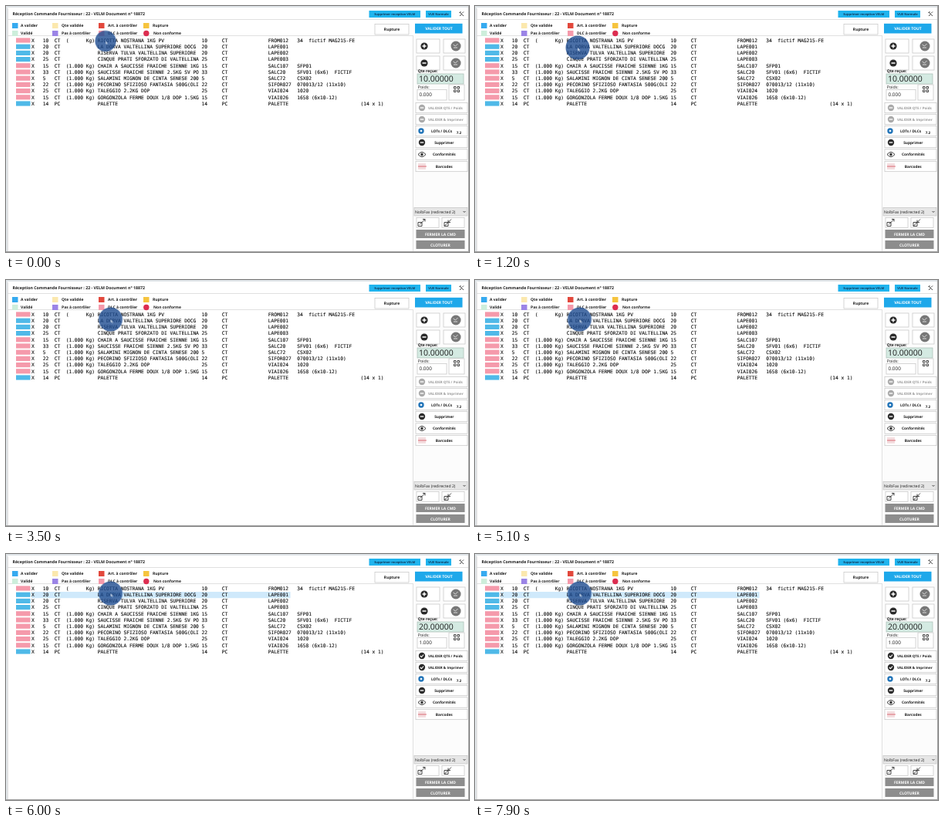
Animation of 600 by 319 pixels, one loop 8 s. Source, as an HTML page:

```html
<!DOCTYPE html>
<html lang="fr">
<head>
<meta charset="utf-8">
<title>Réception commande</title>
<style>
html, body { margin: 0; width: 100%; height: 100%; overflow: hidden; background: #fff; }
svg { display: block; width: 600px; height: 319px; }
text { font: 5px "Open Sans", "Noto Sans", sans-serif; fill: #1c1c1c; text-rendering: geometricPrecision; white-space: pre; }
.b { font-weight: 700; }
.mid { text-anchor: middle; }
.mono { font: 6.23px "DejaVu Sans Mono", monospace; fill: #111; stroke: #111; stroke-width: .12; }
.w { fill: #fff; }
.tiny { font-size: 4px; fill: #123a5c; }
.total { font-size: 10.5px; font-weight: 500; }
.weight { font-size: 6.4px; }
.btn { fill: #fff; stroke: #c4c4c4; stroke-width: .7; }
.line { fill: none; stroke: #333; stroke-width: .9; }
.sel, .on, .off { animation: 8s step-end infinite; }
.sel { animation-name: select; }
.on { animation-name: show; }
.off { animation-name: hide; }
.dot { animation: move 8s linear infinite; }
@keyframes select { 0% { opacity: 0 } 66.25%, 100% { opacity: 1 } }
@keyframes show { 0% { opacity: 0 } 68.75%, 100% { opacity: 1 } }
@keyframes hide { 0% { opacity: 1 } 68.75%, 100% { opacity: 0 } }
@keyframes move {
  0% { transform: translate(129px, 45.5px) scale(.88); animation-timing-function: steps(6) }
  7.5% { transform: translate(130px, 56px) scale(1); animation-timing-function: steps(6) }
  15% { transform: translate(133px, 54px) scale(1); animation-timing-function: steps(9) }
  26.25%, 100% { transform: translate(135.5px, 51px) scale(1) }
}
</style>
</head>
<body>
<svg viewBox="0 0 600 319">
  <rect width="600" height="319" fill="#fff"/>
  <path d="M0 0H600V2H2V319H0z" fill="#dfe4e7"/>
  <path d="M2 17.5H599M2 38.5H527M2.5 3V318M527.5 38V318" fill="none" stroke="#d9d9d9" stroke-width=".8"/>
  <rect x="528" y="38" width="71" height="280" fill="#fcfcfc"/>
  <path d="M0 318.5H600M599.5 0V319" fill="none" stroke="#a0a0a0"/>

  <text class="b" x="8.5" y="12" style="font-size:5.27px">Réception Commande Fournisseur : 22 - VELM Document n° 18872</text>
  <g fill="#20b4ee">
    <rect x="470.5" y="6" width="66.5" height="9"/>
    <rect x="544" y="6" width="33" height="9"/>
  </g>
  <text class="b mid tiny" x="503.7" y="12">Supprimer reception VELM</text>
  <text class="b mid tiny" x="560.5" y="12">VUE Normale</text>
  <path class="line" d="M588 8l5 5M588 13l3-3M587.5 8.5l2-1M591 9.5l2-2" stroke-width="1.2"/>

  <g id="legend"></g>

  <rect class="btn" x="478" y="23.5" width="44" height="13.5"/>
  <text class="b mid" x="500" y="32">Rupture</text>
  <rect x="530" y="22.800" width="61.500" height="12.700" fill="#1ea8ea"/>
  <text class="b mid w" x="561" y="31">VALIDER TOUT</text>

  <rect class="sel" x="33" y="49" width="335.5" height="8.2" fill="#cfe9fb"/>
  <g id="rows"></g>

  <g id="tools"></g>
  <path d="M539.5 52h5M542 49.5v5M539.5 74h5" fill="none" stroke="#fff" stroke-width="1.5"/>
  <path d="M579.5 50l3 2 3-3M580 54h5M579.5 72l3 2 3-3M580 76h5" fill="none" stroke="#d8d8d8"/>

  <text class="b" x="533.700" y="85.500">Qte reçue:</text>
  <rect x="533" y="88" width="60" height="13" fill="#d4eae2" stroke="#a9bdb6" stroke-width=".7"/>
  <text x="533.700" y="106.500" style="font-size:5.300px;font-weight:500">Poids:</text>
  <rect class="btn" x="533" y="108.500" width="38" height="13.500"/>
  <g class="off">
    <text class="total" x="535" y="98.300">10.00000</text>
    <text class="weight" x="535.500" y="117">0.000</text>
  </g>
  <g class="on">
    <text class="total" x="535" y="98.300">20.00000</text>
    <text class="weight" x="535.500" y="117">1.000</text>
  </g>
  <rect class="btn" x="574" y="102" width="20" height="20"/>
  <path class="line" d="M580.500 104.500h2.500v2.500h-2.500zM585 104.500h2.500v2.500h-2.500zM580.500 109h2.500v2.500h-2.500zM585 109h2.500v2.500h-2.500z"/>

  <g id="actions"></g>

  <rect x="529" y="261.500" width="69" height="10.500" fill="#e6e6e6" stroke="#bbb" stroke-width=".6"/>
  <text x="530" y="268.700" style="font-size:5.100px;font-weight:500">NolbFax (redirected 2)</text>
  <path class="line" d="M592.500 266l1.500 1.500 1.500-1.500"/>
  <rect class="btn" x="532" y="274.500" width="29" height="13"/>
  <rect class="btn" x="565" y="274.500" width="29" height="13"/>
  <path class="line" d="M534 280.500h5v5h-5zM536 283.500l7-7M540 276.500h3v3"/>
  <path class="line" d="M568 280.500h5v5h-5zM568 285.500l9-9M573 277.500v3h3"/>
  <g fill="#8d8d8d">
    <rect x="531.500" y="290" width="63" height="11"/>
    <rect x="531.500" y="304" width="63" height="11"/>
  </g>
  <text class="b mid w" x="563" y="297.500">FERMER LA CMD</text>
  <text class="b mid w" x="563" y="311.500">CLOTURER</text>

  <g class="dot">
    <circle r="15.500" fill="#1d4b90" opacity=".8"/>
    <path d="M0 0v4.500l1.200-1 1 1.800.8-.4-.9-1.700H3.500z" fill="#e6eef8" opacity=".7"/>
  </g>
</svg>
<script>
const BLUE = '#4fb9e8', PINK = '#f59aab';
const put = (id, html) => document.getElementById(id).innerHTML = html;
const text = (x, y, s, cls = 'b', style = '') =>
  `<text class="${cls}" x="${x}" y="${y}" style="${style}">${s.replace(/&/g, '&amp;')}</text>`;
const box = (x, y, w, h, extra) => `<rect x="${x}" y="${y}" width="${w}" height="${h}" ${extra}/>`;
const disc = (x, y, r, fill) => `<circle cx="${x}" cy="${y}" r="${r}" fill="${fill}"/>`;
const stroke = (d, color, w = 1) => `<path d="${d}" fill="none" stroke="${color}" stroke-width="${w}"/>`;

// Legend: swatch x, label x, row, colour, label
put('legend', [
  [8, 19, 0, '#35aaf0', 'A valider'],
  [60, 72, 0, '#fbe8ad', 'Qte validée'],
  [120, 132, 0, '#e2483c', 'Art. à contrôler'],
  [178, 190, 0, '#f6c43e', 'Rupture'],
  [8, 19, 1, '#cdeedb', 'Validé'],
  [60, 72, 1, '#9b84e6', 'Pas à contrôler'],
  [120, 132, 1, PINK, 'DLC à contrôler'],
  [178, 191, 1, '#dc2d50', 'Non conforme']
].map(([x, tx, row, color, label], i) => {
  const y = 25.5 + row * 10;
  const mark = i == 7 ? disc(x + 3.8, y, 3.7, color) : box(x, y - 3.5, 7.5, 7, `fill="${color}"`);
  return mark + text(tx, y + 1.8, label);
}).join(''));

// Order lines: quantity, unit, weight, description, reference, note
const KG = '(1.000 Kg)';
const lines = [
  ['10', 'CT', '(      Kg)', 'RICOTTA NOSTRANA 1KG PV', 'FROM012', '34  fictif MAG215-FE'],
  ['20', 'CT', '', 'LA DORVA VALTELLINA SUPERIORE DOCG', 'LAPE001', ''],
  ['20', 'CT', '', 'RISERVA TULVA VALTELLINA SUPERIORE', 'LAPE002', ''],
  ['25', 'CT', '', 'CINQUE PRATI SFORZATO DI VALTELLINA', 'LAPE003', ''],
  ['15', 'CT', KG, 'CHAIR A SAUCISSE FRAICHE SIENNE 1KG', 'SALC107', 'SFP01'],
  ['33', 'CT', KG, 'SAUCISSE FRAICHE SIENNE 2.5KG SV PO', 'SALC20', 'SFV01 (6x6)  FICTIF'],
  ['5', 'CT', KG, 'SALAMINI MIGNON DE CINTA SENESE 200', 'SALC72', 'CSX02'],
  ['22', 'CT', KG, 'PECORINO SFIZIOSO FANTASIA 500G(OLI', 'SIFOR027', '070013/12 (11x10)'],
  ['25', 'CT', KG, 'TALEGGIO 2.2KG DOP', 'VIAI024', '1020'],
  ['15', 'CT', KG, 'GORGONZOLA FERME DOUX 1/8 DOP 1.5KG', 'VIAI026', '1658 (6x10-12)'],
  ['14', 'PC', '', 'PALETTE', 'PALETTE', ' '.repeat(22) + '(14 x 1)']
];
put('rows', lines.map(([qty, unit, kg, name, ref, note], i) => {
  const y = 44.6 + i * 8.2;
  const color = i && i < 4 || i == 10 ? BLUE : PINK;
  const s = qty.padEnd(4) + unit.padEnd(4) + kg.padEnd(11) + name.padEnd(36) +
    qty.padEnd(7) + unit.padEnd(16) + ref.padEnd(10) + note;
  return box(13, y - 3.2, 18.5, 6.2, `fill="${color}"`) +
    text(32.9, y + 2.2, 'X', 'mono') + text(47.7, y + 2.2, s, 'mono');
}).join(''));

// Plus, minus and side buttons
put('tools', [52, 74].map(y =>
  box(532, y - 9, 30, 18, 'class="btn"') + disc(542, y, 4.6, '#2b2b2b') +
  box(567, y - 9, 28, 18, 'class="btn"') + disc(583, y, 6.5, '#777')).join(''));

const minus = (y, color) => disc(539, y, 4.2, color) + stroke(`M536.7 ${y}h4.6`, '#fff', 1.3);
const check = y => disc(539, y, 4.2, '#2b2b2b') + stroke(`M536.8 ${y}l1.6 1.7 2.8-3.2`, '#fff', 1.1);
const toggled = (y, label) =>
  `<g class="off">${minus(y, '#aaa')}${text(547, y + 1.7, label, 'b', 'font-size:4.5px;fill:#9a9a9a')}</g>` +
  `<g class="on">${check(y)}${text(547, y + 1.7, label, 'b', 'font-size:4.5px')}</g>`;
const label = (y, s, x = 567.8) => text(x, y + 1.7, s, 'b mid', 'font-size:4.8px');
const bars = [0, 2, 4, 6, 8].map(d => `M${535 + d} 204v8`).join('');

put('actions', [132, 147, 162, 177, 192.5, 208].map(y => box(531, y - 6.7, 67, 13.4, 'class="btn"')).join('') +
  toggled(132, 'VALIDER QTE / Poids') +
  toggled(147, 'VALIDER & Imprimer') +
  disc(538, 162, 3.7, '#2274b8') + disc(538, 162, 1.3, '#fff') +
  label(162, 'LOTs / DLCs', 564.5) + text(583.7, 165.5, '7.2', 'b', 'font-size:4.6px') +
  minus(177, '#2b2b2b') + label(177, 'Supprimer') +
  stroke('M534 192.5q5-6 10 0q-5 6-10 0z', '#333') + disc(539, 192.5, 1.7, '#333') + label(192.5, 'Conformités') +
  stroke(bars, '#e3a9ae', .8) + stroke('M534 208h11', '#cf3a48', .7) + label(208, 'Barcodes'));
</script>
</body>
</html>
```
